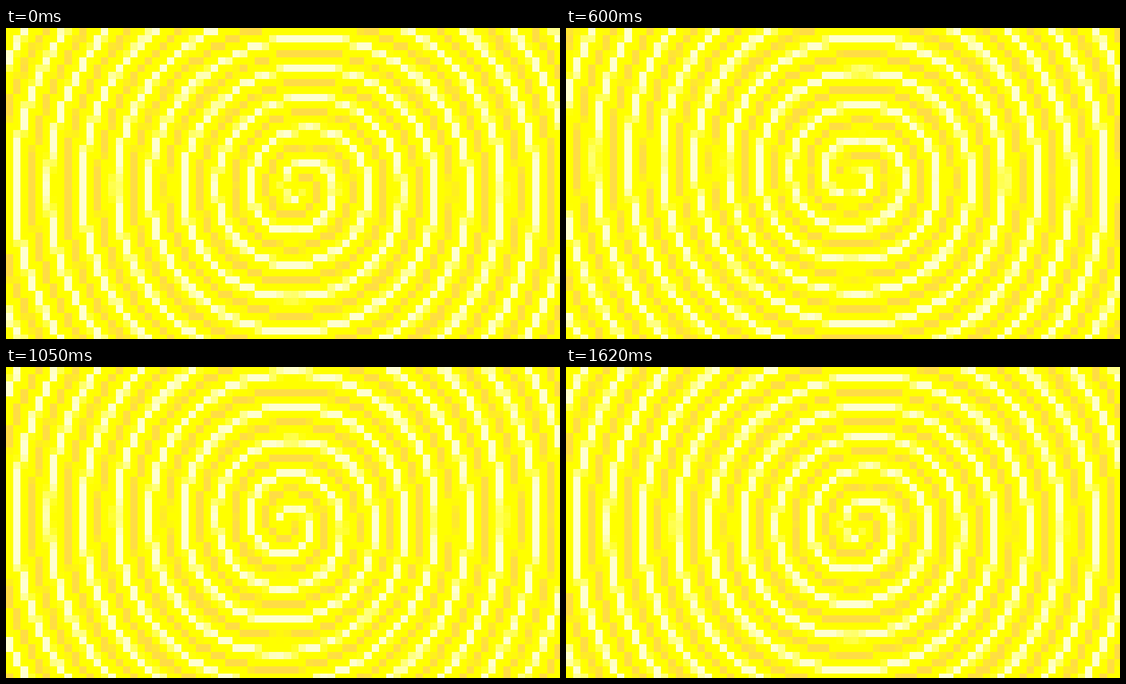
Animation of 998 by 561 pixels, one loop 1.65 s. Source, as an HTML page with a canvas:

```html
<!DOCTYPE html>
<html lang="en">
<head>
<meta charset="utf-8">
<title>Pixel spiral</title>
<style>
  html, body { margin: 0; width: 100%; height: 100%; overflow: hidden; background: #ff0; }
  canvas { display: block; }
</style>
</head>
<body>
<canvas id="stage" width="998" height="561"></canvas>
<script>
const W = 998, H = 561, CELL = 13.17;
const STEP = 30, LOOP = 1650, STEPS = 54;
const TAU = Math.PI * 2;
const PIVOT = { x: 521.5, y: 279 };
const ORBIT = { r: 14, angle: 47 * Math.PI / 180 };
const PITCH = 60.5, START = 61;
const BASE = [255, 255, 0], PALE = [255, 255, 208], GOLD = [255, 221, 68];

const ctx = document.getElementById('stage').getContext('2d');
const clamp = v => Math.max(0, Math.min(1, v));
const smooth = v => { const k = clamp(v); return k * k * (3 - 2 * k); };
const mix = (a, b, k) => a.map((v, i) => Math.round(v + (b[i] - v) * k));

// Coverage of a soft-edged line at a distance from its middle
const cover = (dist, half, soft) => clamp((half + soft / 2 - dist) / soft);

// Colour of the spiral at an offset from its centre
function shade(dx, dy, turn) {
  const r = Math.hypot(dx, dy);
  const angle = Math.atan2(dy, dx) + turn;
  const taper = clamp(0.45 + r / 90);
  // The turns are pressed together on one side and slightly oval
  const squeeze = Math.max(0, -Math.sin(angle)) ** 2;
  const dent = 19 * squeeze * smooth((r - 110) / 210);
  const oval = 3 * taper * Math.sin(2 * angle);
  const phase = (r + dent + oval - START) / PITCH - angle / TAU;
  const near = Math.abs(phase - Math.round(phase));
  const half = (6.3 - 0.7 * squeeze) * taper;
  const pale = cover(near * PITCH, half, 4);
  if (pale > 0) return mix(BASE, PALE, pale);
  return mix(BASE, GOLD, cover((0.5 - near) * PITCH, half - 0.2, 2.5));
}

function draw(step) {
  const turn = step / STEPS * TAU;
  const cx = PIVOT.x + ORBIT.r * Math.cos(ORBIT.angle - turn);
  const cy = PIVOT.y + ORBIT.r * Math.sin(ORBIT.angle - turn);
  for (let row = 0; row * CELL < H; row++) {
    const top = Math.round(row * CELL), bottom = Math.round((row + 1) * CELL);
    for (let col = 0; col * CELL < W; col++) {
      const left = Math.round(col * CELL), right = Math.round((col + 1) * CELL);
      const rgb = shade((col + 0.5) * CELL - cx, (row + 0.5) * CELL - cy, turn);
      ctx.fillStyle = `rgb(${rgb})`;
      ctx.fillRect(left, top, right - left, bottom - top);
    }
  }
}

const begin = performance.now();
let shown = -1;
function tick() {
  const step = Math.floor((performance.now() - begin) % LOOP / STEP);
  if (step !== shown) draw(shown = step);
  requestAnimationFrame(tick);
}
tick();
</script>
</body>
</html>
```
